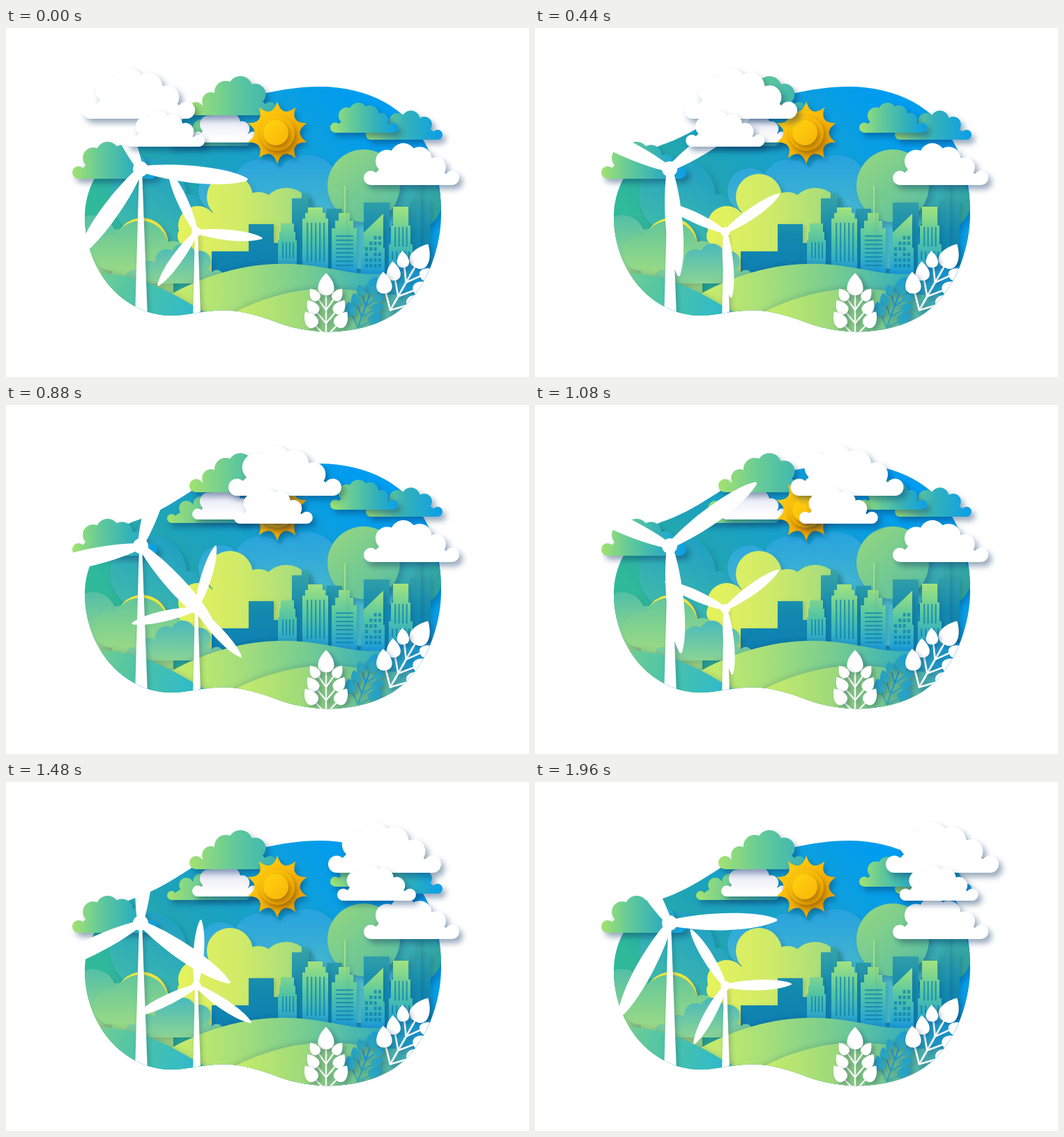
An HTML page with a canvas for the animation above (2000 ms loop, 750x500 px).

```html
<!DOCTYPE html>
<html lang="en">
<head>
<meta charset="utf-8">
<title>Green city</title>
<style>
html, body { margin: 0; width: 750px; height: 500px; overflow: hidden; background: #fff; }
canvas { display: block; }
</style>
</head>
<body>
<canvas id="stage" width="750" height="500"></canvas>
<script>
const { PI, sin, cos, min } = Math;
const view = document.getElementById('stage').getContext('2d');
const scene = document.createElement('canvas');
scene.width = 750;
scene.height = 500;
let c = scene.getContext('2d');

function grad(x0, y0, x1, y1, ...colors) {
  const g = c.createLinearGradient(x0, y0, x1, y1);
  colors.forEach((color, i) => g.addColorStop(i / (colors.length - 1), color));
  return g;
}
const across = (l, r, ...colors) => grad(l, 0, r, 0, ...colors);
const down = (top, base, ...colors) => grad(0, top, 0, base, ...colors);

function shadow(alpha, blur = 9, x = 5, y = 6) {
  c.shadowColor = `rgba(8,50,95,${alpha})`;
  c.shadowBlur = blur;
  c.shadowOffsetX = x;
  c.shadowOffsetY = y;
}

function fill(shape, color) {
  c.fillStyle = color;
  c.fill(typeof shape === 'string' ? new Path2D(shape) : shape);
}

// Circles [x, y, r] joined down to a flat base.
function puffs(base, color, ...bumps) {
  const p = new Path2D();
  p.moveTo(bumps[0][0], base);
  bumps.forEach(b => p.lineTo(b[0], b[1]));
  p.lineTo(bumps.at(-1)[0], base);
  p.closePath();
  for (const [x, y, r] of bumps) {
    p.moveTo(x + r, y);
    p.arc(x, y, r, 0, 7);
  }
  fill(p, color);
}

const disc = (x, y, r, color) => puffs(y, color, [x, y, r]);

// Bumps rise and swell along a skewed sine; skew below 1 puts the peak on the left.
function cloud(l, r, top, base, color, skew = 0.8) {
  const h = base - top, end = h * 0.17, bumps = [];
  for (let i = 0; i < 6; i++) {
    const u = i / 5, s = sin(PI * u ** skew), rad = end + h * 0.14 * s;
    bumps.push([l + end + u * (r - l - 2 * end), base - h * (0.34 + 0.66 * s) + rad, rad]);
  }
  puffs(base, color, ...bumps);
}

function bars(n, x, y, dx, dy, w, h) {
  for (let i = 0; i < n; i++) c.fillRect(x + i * dx, y + i * dy, w, h);
}

function leaf(x, y, angle, len) {
  const w = len * 0.48;
  c.save();
  c.translate(x, y);
  c.rotate(angle);
  c.beginPath();
  c.bezierCurveTo(0, 0, 0, 0, 0, 0);
  c.bezierCurveTo(-w, 0, -w, -len * 0.55, 0, -len);
  c.bezierCurveTo(w, -len * 0.55, w, 0, 0, 0);
  c.fill();
  c.restore();
}

function plant(x, y, angle, scale, color) {
  c.save();
  c.translate(x, y);
  c.rotate(angle);
  c.scale(scale, scale);
  c.fillStyle = color;
  c.fillRect(-1.2, -58, 2.4, 64);
  leaf(0, -54, 0, 32);
  for (const side of [-1, 1])
    for (let i = 0; i < 3; i++) {
      const lx = side * (11.5 + 2 * i), ly = -47 + 19 * i;
      c.lineWidth = 2.2;
      c.strokeStyle = color;
      c.beginPath();
      c.moveTo(0, ly + 14);
      c.lineTo(lx, ly - 2);
      c.stroke();
      leaf(lx, ly, side * 0.6, 20 + 3 * i);
    }
  c.restore();
}

function sky() {
  c.fillStyle = grad(480, 80, 200, 330, '#009cf0', '#12a0d6', '#1fa3b6', '#30b99a');
  c.fillRect(90, 70, 560, 380);
  shadow(0.25);
  puffs(345, grad(240, 190, 170, 310, '#1f9fc4', '#43bda8'), [204, 241, 55], [262, 268, 30]);
  puffs(345, down(185, 290, '#27a3de', '#4dbcc9'), [308, 233, 32], [365, 228, 40], [431, 232, 50], [520, 260, 40]);
  disc(585, 249, 40, grad(545, 210, 620, 290, '#3fb4c4', '#2a9c92'));
  puffs(330, grad(470, 190, 560, 280, '#8fd584', '#55bda2'), [513, 226, 52]);
  puffs(350, across(250, 438, '#e6f25c', '#cdea6a', '#9cd982'),
    [262, 298, 16], [275, 283, 28], [321, 242, 33], [362, 262, 27], [402, 266, 37]);
}

function tower(x, w, top, inset, step) {
  const p = new Path2D();
  for (let i = 0; i < 3; i++) p.rect(x + (2 - i) * inset, top + i * step, w - 2 * (2 - i) * inset, 355 - top);
  c.save();
  c.beginPath();
  c.rect(0, 0, 750, 352);
  c.clip();
  fill(p, down(258, 350, '#a0e27f', '#52c4a4', '#1c9fdc'));
  c.restore();
}

function skyline() {
  shadow(0.2, 6, 3, 2);
  c.fillStyle = down(240, 350, '#36a3a8', '#1389ae', '#0d80b2');
  for (const [x, w, top] of [[295, 60, 320], [348, 36, 281], [383, 30, 308], [410, 29, 244],
    [424, 10, 237], [460, 22, 259], [513, 37, 250], [579, 30, 248], [588, 7, 215]])
    c.fillRect(x, top, w, 355 - top);

  tower(390, 27, 280, 2, 12);
  tower(425, 37, 257, 4, 8);
  tower(467, 36, 265, 5, 11);
  tower(485, 2, 226, 0, 9);
  tower(549, 34, 256, 3, 27);
  fill('M513 293 L541 266 V315 H543 V354 H509 V315 H513Z', down(266, 350, '#a0e27f', '#52c4a4', '#1c9fdc'));

  shadow(0);
  c.fillStyle = down(270, 350, '#2fa0a8', '#1285b4');
  bars(4, 396, 307, 5, 0, 2, 23);
  bars(5, 431, 279, 6, 0, 2.3, 56);
  bars(8, 473, 297, 0, 6, 25, 2.2);
  bars(4, 557, 285, 5.5, 0, 2.3, 28);
  bars(5, 553, 320, 6, 0, 2.3, 12);
  for (let row = 0; row < 6; row++)
    for (let col = 0; col < 4; col++)
      if ((row * 3 + col * 5) % 7 && row + col > 1) c.fillRect(515 + col * 6.3, 298 + row * 8, 4, 5);
}

function ground() {
  shadow(0.22);
  puffs(370, down(268, 365, '#52bfa6', '#a9de83'), [125, 301, 33], [160, 312, 24]);
  disc(195, 310, 38, '#f5e83e');
  puffs(380, down(275, 365, '#62c69a', '#a4de82'), [152, 322, 26], [193, 316, 40], [240, 325, 20]);
  cloud(172, 312, 309, 366, down(308, 368, '#48b9bd', '#8dd592'), 1.35);
  shadow(0.18, 8, 0, -2);
  fill('M225 388 C290 349 360 333 425 339 C480 345 500 355 540 352 C575 349 590 343 640 335 V450 H225Z',
    across(240, 630, '#c9ed6a', '#a4de7b', '#73cb92', '#35b0bb', '#0792ea'));
  fill('M315 414 C365 386 420 370 480 374 C530 378 565 390 610 375 V450 H315Z',
    across(335, 610, '#c5eb6c', '#9eda7b', '#6cc394', '#259fd2'));
  fill('M100 353 C175 344 225 370 292 412 L220 450 H100Z',
    grad(115, 360, 285, 405, '#78d08e', '#48c2ac', '#2ab8d2'));
  shadow(0.35, 7, 4, 3);
  plant(506, 425, 0.35, 0.85, down(-80, 5, '#009cf8', '#1598dc', '#36a9b0'));
  plant(459, 437, 0, 1, '#fff');
  plant(554, 399, 0.52, 1.2, '#fff');
}

function sun() {
  const at = (r, i) => [389 + r * sin(i * PI / 10), 150 - r * cos(i * PI / 10)];
  shadow(0.45, 8, 3, 5);
  c.beginPath();
  c.moveTo(...at(45, 0));
  for (let i = 0; i < 20; i += 2) c.quadraticCurveTo(...at(22, i + 1), ...at(45, i + 2));
  c.fillStyle = grad(355, 115, 425, 185, '#ffd013', '#f9b608', '#e29a00');
  c.fill();
  c.shadowColor = 'rgba(130,75,0,.6)';
  disc(389, 151, 25, grad(370, 130, 410, 175, '#ffc80c', '#eda500'));
  disc(387, 150, 18, grad(373, 137, 402, 166, '#ffd010', '#f8b508'));
}

function stillClouds() {
  const lime = '#a4e270', mint = '#62c99a', teal = '#35b2b8', blue = '#0a9ee8';
  shadow(0.42);
  cloud(231, 350, 131, 169, across(231, 345, lime, mint, teal));
  cloud(267, 362, 118, 164, down(126, 158, '#e3e4f4', '#fff'));
  cloud(263, 388, 69, 125, across(263, 392, lime, mint, teal), 1.3);
  cloud(95, 217, 163, 216, across(95, 217, lime, mint, teal, blue));
  cloud(516, 626, 118, 160, across(516, 626, lime, teal, blue), 1.2);
  cloud(465, 562, 107, 150, across(465, 562, lime, mint, teal, blue));
  cloud(513, 650, 165, 225, '#fff');
}

const blob = new Path2D('M113 270 C113 235 130 190 180 168 C235 150 265 118 300 106 ' +
  'C350 102 390 84 450 84 C520 84 575 115 601 165 C620 200 624 235 624 265 ' +
  'C624 330 592 397 540 419 C500 438 445 441 395 424 C350 407 325 403 300 405 ' +
  'C270 407 260 412 235 412 C165 410 113 345 113 270Z');
c.save();
c.clip(blob);
sky();
skyline();
ground();
c.restore();
stillClouds();
sun();

const blade = new Path2D('M0 -4 C45 -15 125 -15 153 -2 C156 0 154 2 150 3 C115 16 50 15 0 4Z');

function turbine(x, y, scale, angle) {
  c.save();
  c.clip(blob);
  shadow(0.25, 6, 3, 3);
  fill(`M${x - 2} ${y} h4 L${x + 10 * scale} 415 H${x - 8 * scale}Z`, '#fff');
  c.restore();
  shadow(0);
  c.save();
  c.translate(x, y);
  c.scale(scale, scale);
  c.rotate(angle);
  for (let i = 0; i < 3; i++) {
    fill(blade, '#fff');
    c.rotate(PI * 2 / 3);
  }
  disc(0, 0, 11, '#fff');
  c.restore();
}

// Gentle start, steady middle, gentle stop.
function drift(t) {
  if (t < 569) return 0.13 * t * t / 569;
  if (t < 1269) return 0.26 * t - 74;
  return 351 - 0.13 * (2000 - t) ** 2 / 731;
}

// One turn per loop, running slightly ahead around the middle.
function spin(t) {
  return (5.6 + 0.18 * t + 4 * sin(PI * (t - 100) / 2000) ** 4) * PI / 180;
}

function draw(now) {
  const t = Math.floor(now % 2000 / 40) * 40, far = min(t * 0.2385, 394), near = drift(t);
  c = view;
  shadow(0);
  c.fillStyle = '#fff';
  c.fillRect(0, 0, 750, 500);
  c.drawImage(scene, 0, 0);
  turbine(193, 202, 1, spin(t));
  turbine(273, 292, 0.615, spin(t));
  shadow(0.42);
  cloud(109 + far, 271 + far, 58, 130, '#fff');
  cloud(172 + near, 285 + near, 119, 170, '#fff');
  requestAnimationFrame(draw);
}
requestAnimationFrame(draw);
</script>
</body>
</html>
```
